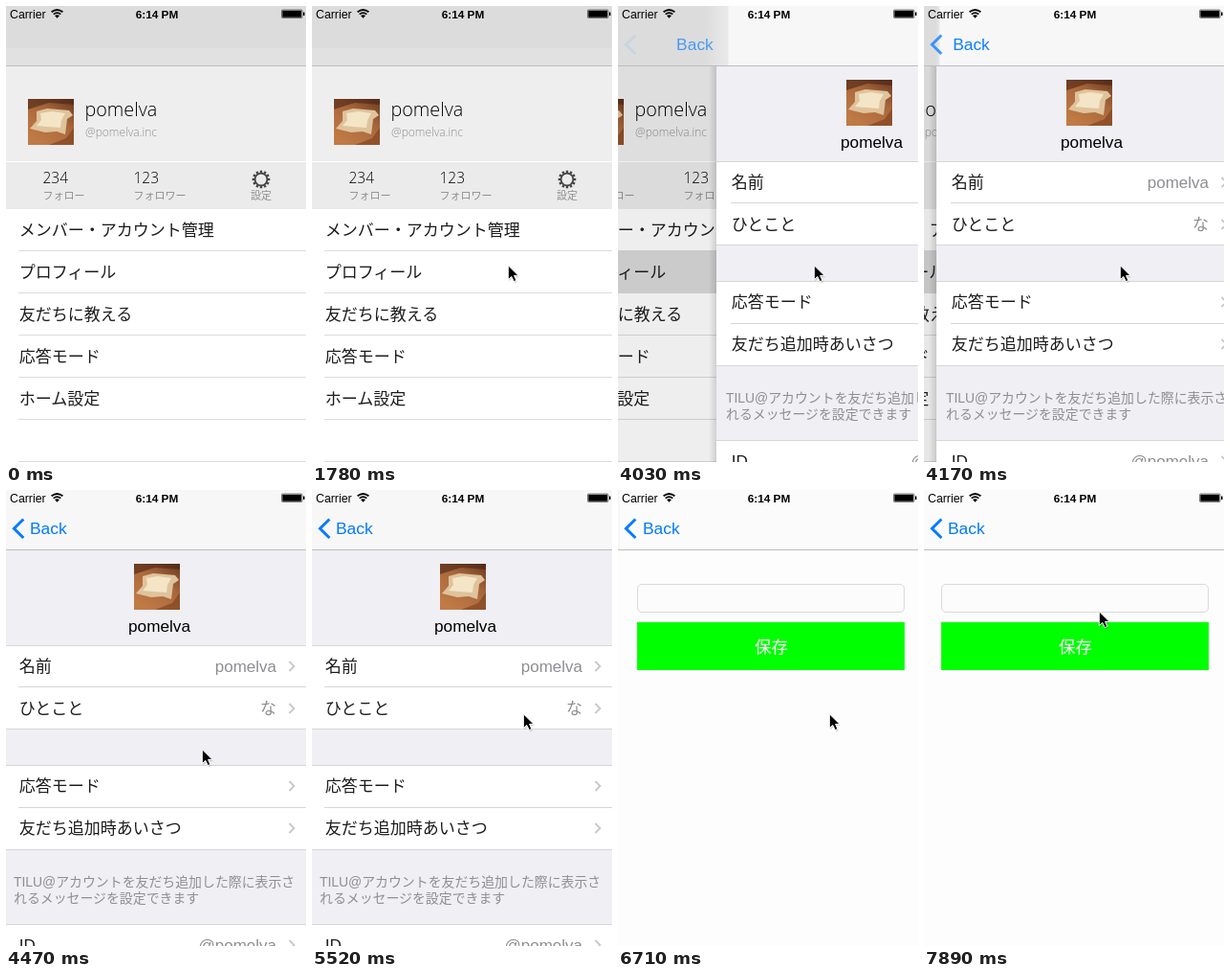
These frames come from a looping animation (314x476 px, 8000 ms). An HTML page:

```html
<!DOCTYPE html>
<html lang="ja">
<head>
<meta charset="utf-8">
<title>Settings walkthrough</title>
<style>
html, body { margin: 0; width: 100%; height: 100%; overflow: hidden; background: #fff; }
svg { display: block; width: 314px; height: 476px; font: 300 17px "Liberation Sans", "Noto Sans CJK JP Light", "Noto Sans CJK JP DemiLight", "Noto Sans CJK JP", "Noto Sans CJK", sans-serif; }
.thin { font-family: "Open Sans", "Noto Sans CJK JP", sans-serif; }
.label { fill: #1c1c1c; }
.mute { fill: #8e8e93; }
.blue { fill: #007aff; font-size: 17.4px; }
.end { text-anchor: end; }
.mid { text-anchor: middle; }
</style>
</head>
<body>
<svg viewBox="0 0 314 476">
  <defs>
    <linearGradient id="shade">
      <stop offset="0" stop-opacity="0"/><stop offset="1" stop-opacity=".13"/>
    </linearGradient>
    <linearGradient id="barFade">
      <stop offset=".78" stop-color="currentColor"/><stop offset="1" stop-color="currentColor" stop-opacity=".5"/>
    </linearGradient>
    <linearGradient id="wood" x1="1" y1="0" x2=".3" y2="1">
      <stop offset="0" stop-color="#6b3a20"/><stop offset=".45" stop-color="#a8673c"/><stop offset="1" stop-color="#c07a45"/>
    </linearGradient>
    <clipPath id="labels"><path d="M13 20H314V62H13Z"/></clipPath>
    <g id="avatar">
      <path fill="url(#wood)" d="M0 0H48V48H0Z"/>
      <path fill="#4a2414" opacity=".6" d="M0 0H48V6L22 4 0 11Z"/>
      <path fill="#7a3d1c" opacity=".6" d="M48 30V48H22L40 41Z"/>
      <path fill="#dfc39c" d="M9 13 20 10 43 12 47 17 41 21 39 37 30 34 18 35 2 31 9 23Z"/>
      <path fill="#f4e5c6" d="M13 15 25 13 39 15 35 22 34 30 20 29 9 28 14 22Z"/>
    </g>
    <path id="chevron" d="M0-5 5 0 0 5" fill="none" stroke="#c7c7cc" stroke-width="1.8"/>
  </defs>
  <g id="menu"></g>
  <g id="profile"></g>
  <g id="editor"></g>
  <g id="nav">
    <path id="bar" d="M0 0H314V62H0Z"/>
    <rect id="barOld" height="62" fill="url(#barFade)"/>
    <path id="barLow" d="M0 44H314V62H0Z" fill="#e1e1e1"/>
    <path d="M0 62.5H314" stroke="#bdbdbf"/>
    <g clip-path="url(#labels)">
      <text id="oldBack" class="blue" y="46">Back</text>
    </g>
    <text id="back" class="blue" y="46">Back</text>
    <path id="arrow" d="M18.3 30.5 8.4 40.2 18.3 50" fill="none" stroke="#007aff" stroke-width="3"/>
    <text x="4" y="13" font-size="12.3" font-weight="400">Carrier</text>
    <text x="158" y="13" class="mid" font-size="11.8" font-weight="700">6:14 PM</text>
    <path d="M47.6 6.3Q53.5 1.6 59.4 6.3M49.7 8.6Q53.5 5.6 57.3 8.6" fill="none" stroke="#000" stroke-width="1.8"/>
    <path d="M51 10Q53.5 8.4 56 10L53.5 12.8Z"/>
    <rect x="288.5" y="4" width="21.5" height="8.5" rx="1" fill="none" stroke="#000" stroke-width=".5"/>
    <path d="M289.3 4.8H309.2V11.7H289.3ZM311 6.5H312.5V10H311Z"/>
  </g>
  <g id="cursor">
    <path d="M2.3 1.2V16.2L5.8 13.2 8.3 18.2 10.8 17.2 8.5 12.2H13Z" opacity=".16"/>
    <path d="M1.3-.2V14.6L4.8 11.5 7.3 16.6 9.9 15.5 7.6 10.4H12.1Z" stroke="#fff" stroke-width="1"/>
  </g>
</svg>
<script>
const LOOP = 8000, W = 314;
const LEFT = -2; // screens reach slightly past the stage
const $ = id => document.getElementById(id);
const rect = (x, y, w, h, fill, more = '') => `<rect x="${x}" y="${y}" width="${w}" height="${h}" fill="${fill}" ${more}/>`;
const band = (y, h, fill, more) => rect(LEFT, y, W - LEFT, h, fill, more);
const line = (x, y, color) => rect(x, y, W - x, 1, color);
const text = (x, y, str, more = '') => `<text x="${x}" y="${y}" ${more}>${str}</text>`;
const label = (y, str) => text(13.7, y + 6, str, 'class="label"');
const avatar = (x, y) => `<use href="#avatar" x="${x}" y="${y}"/>`;
const page = (bg, body) =>
  rect(LEFT - 8, 62, 8, 414, 'url(#shade)') + band(62, 414, bg) + body +
  band(62, 414, '#000', 'class="dim" opacity="0"');

// Menu screen
const small = 'class="mute" font-size="11"';
const count = 'class="thin" font-size="15.5"';
const teeth = Array.from({ length: 12 }, (_, i) =>
  `<path d="M0-7V-9.3" stroke-width="2.4" transform="rotate(${i * 30})"/>`).join('');
const items = ['メンバー・アカウント管理', 'プロフィール', '友だちに教える', '応答モード', 'ホーム設定'];

$('menu').innerHTML = page('#fff',
  band(62, 150, '#eee') + band(162, 1, '#fff') + band(163, 49, '#ebebeb') +
  avatar(23, 97) +
  text(82.5, 115, 'pomelva', 'class="thin" font-size="19.8"') +
  text(83, 136, '@pomelva.inc', 'class="thin mute" font-size="12"') +
  text(38.5, 185, '234', count) + text(38.5, 202, 'フォロー', small) +
  text(133.5, 185, '123', count) + text(133.5, 202, 'フォロワー', small) +
  `<g transform="translate(267 181)" fill="none" stroke="#444"><circle r="6.4" stroke-width="1.8"/>${teeth}</g>` +
  text(267, 202, '設定', 'class="mute mid" font-size="11"') +
  items.map((_, i) => line(13, 255 + 44 * i, '#dcdcdc')).join('') + line(13, 475, '#dcdcdc') +
  band(255, 45, '#d9d9d9', 'id="pickMenu"') +
  items.map((s, i) => label(233.5 + 44 * i, s)).join(''));

// Profile screen
const edge = '#d6d6da';
const box = (y, h) => band(y, h, '#fff') + line(LEFT, y, edge) + line(LEFT, y + h - 1, edge);
const row = (y, name, value = '') =>
  label(y, name) + text(283, y + 6, value, 'class="mute end"') +
  `<use href="#chevron" x="296.5" y="${y}"/>`;
const note = 'class="mute" font-size="13.9"';

$('profile').innerHTML = page('#efeff4',
  avatar(134, 77) + text(160.5, 148, 'pomelva', 'class="mid" font-size="17.2"') +
  box(162, 88) + line(13, 205, edge) + box(287, 89) + line(13, 331, edge) + box(453, 60) +
  band(205, 45, '#d9d9d9', 'id="pickRow"') +
  row(184, '名前', 'pomelva') + row(228, 'ひとこと', 'な') +
  row(309, '応答モード') + row(353, '友だち追加時あいさつ') +
  row(475, 'ID', '@pomelva') +
  text(8, 413.5, 'TILU@アカウントを友だち追加した際に表示さ', note) +
  text(8, 430.5, 'れるメッセージを設定できます', note));

// Editor screen
$('editor').innerHTML = page('#fdfdfd',
  rect(18.5, 98.5, 279, 29, '#fcfcfc', 'rx="4.5" stroke="#dadada"') +
  rect(18, 138, 280, 50, '#0f0') +
  text(158.5, 169.5, '保存', 'class="mid" fill="#fff" font-size="17.5"'));

// Pointer stops: time, x, y
const stops = [
  [1040, 309, 370], [1190, 243, 314], [1330, 226, 296], [1480, 213, 277], [1630, 207, 271],
  [1780, 204, 271], [5220, 182, 244], [5370, 214, 234], [5520, 220, 234], [7450, 220, 233],
  [7600, 193, 180], [7750, 184, 152], [7890, 182, 127]
];
// Each push is seen only at its ticks; travel is how far the back label slides
const pushes = [
  { start: 3905, ticks: [4030, 4170, 4320, 4470], travel: 108 },
  { start: 6314, ticks: [6410, 6560, 6710, 6860], travel: 148 }
];
const barFill = ['#dcdcdc', '#f7f7f8', '#fbfbfb'];

// Critically damped spring, in whole pixels left to travel
function pushOffset({ start, ticks }, t) {
  const tick = ticks.findLast(k => k <= t);
  if (!tick) return W;
  const k = 18.26 * (tick - start) / 1000;
  return Math.round(W * (1 + k) * Math.exp(-k));
}

const move = (el, x, y = 0) => el.setAttribute('transform', `translate(${x} ${y})`);
const show = (id, on) => { $(id).style.display = on ? '' : 'none'; };

function draw(t) {
  const offs = pushes.map(p => pushOffset(p, t));
  const done = offs.map(o => 1 - o / W);
  const level = offs.filter(o => o < W).length;

  ['menu', 'profile', 'editor'].forEach((id, i) => {
    const shift = i < 2 ? -Math.round(97.5 * done[i]) : 0;
    move($(id), (i ? offs[i - 1] : 0) + shift);
    $(id).querySelector('.dim').setAttribute('opacity', i < 2 ? 0.1 * done[i] : 0);
  });
  show('profile', level > 0);
  show('editor', level > 1);
  show('pickMenu', t >= 2830);
  show('pickRow', t >= 6270);

  const off = level ? offs[level - 1] : 0;
  const p = level ? done[level - 1] : 0;
  $('bar').setAttribute('fill', barFill[level]);
  $('barFade').setAttribute('color', barFill[Math.max(level - 1, 0)]);
  $('barOld').setAttribute('width', off * 1.1);
  show('barLow', !level);
  $('back').setAttribute('x', level ? 25 + pushes[level - 1].travel * (1 - p) : 25);
  $('back').setAttribute('opacity', p);
  $('oldBack').setAttribute('x', 25 - 60 * p);
  $('oldBack').setAttribute('opacity', level > 1 ? (1 - p) ** 2 : 0);
  $('arrow').setAttribute('opacity', level > 1 ? 1 : p ** 6);

  const stop = stops.findLast(s => s[0] <= t);
  show('cursor', stop);
  if (stop) move($('cursor'), stop[1], stop[2]);
}

const begin = performance.now();
function loop() {
  draw((performance.now() - begin) % LOOP);
  requestAnimationFrame(loop);
}
loop();
</script>
</body>
</html>
```
